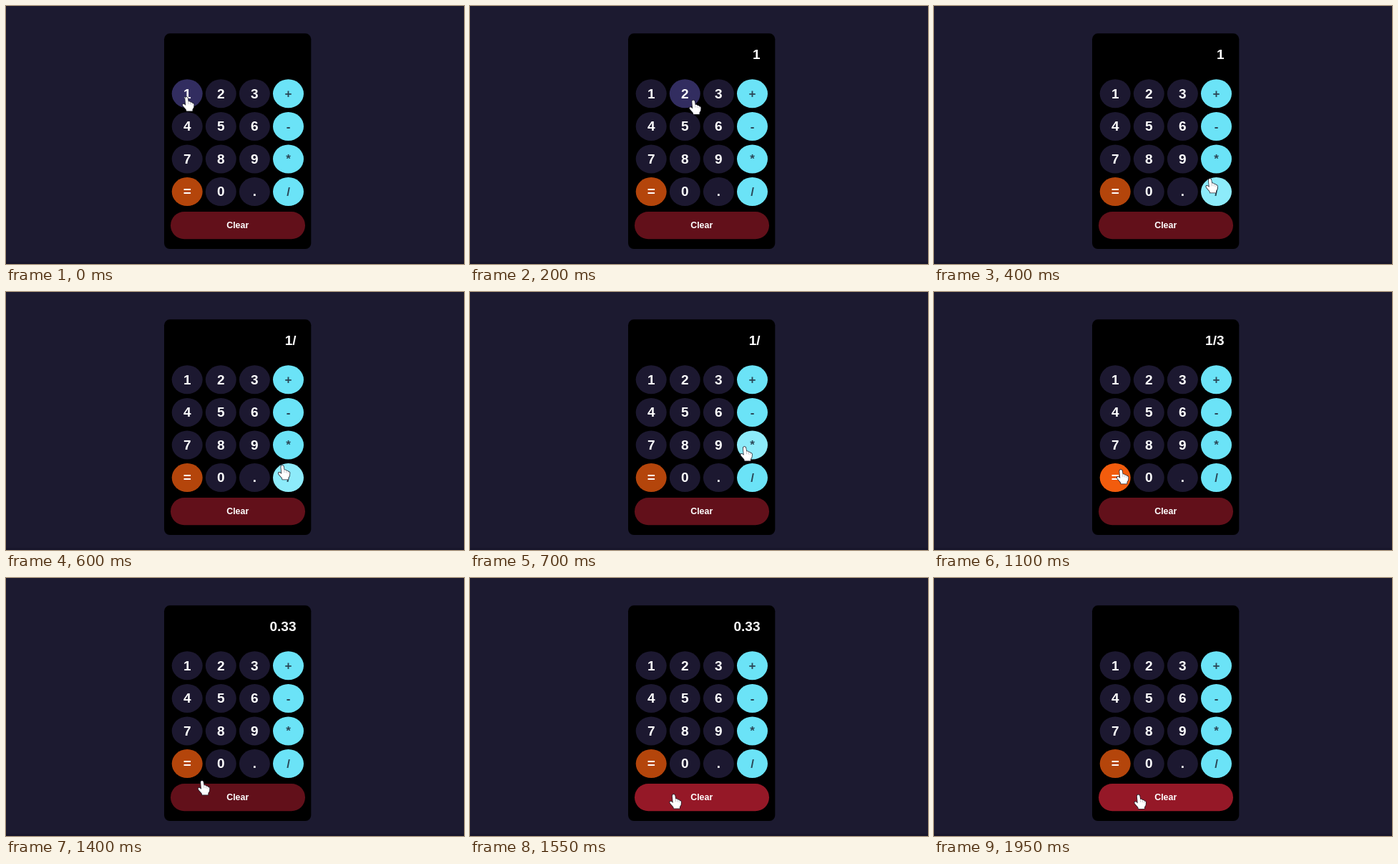
Animation, 640 px wide and 360 px high, one loop 2 s. Source, as an HTML page with a canvas:

```html
<!DOCTYPE html>
<html lang="en">
<head>
<meta charset="utf-8">
<title>Calculator</title>
<style>
html, body { margin: 0; width: 100%; height: 100%; overflow: hidden; background: #1c1a30; }
canvas { display: block; width: 640px; height: 360px; }
</style>
</head>
<body>
<canvas id="stage" width="640" height="360"></canvas>
<script>
const ctx = document.getElementById('stage').getContext('2d');
const LOOP = 2000, STEP = 50;
const FONT = '"Liberation Sans", Arial, sans-serif';

const THEMES = {
  digit: { base: '#1c1830', hover: '#322d60', ink: '#ffffff', size: 19 },
  op: { base: '#6be3f7', hover: '#8debfa', ink: '#2b4757', size: 17 },
  equals: { base: '#b4450b', hover: '#f25c0d', ink: '#ffffff', size: 19 }
};

const keys = [...'123+456-789*=0./'].map((label, i) => ({
  label,
  x: 253.2 + (i % 4) * 47.1,
  y: 122.3 + Math.floor(i / 4) * 45.6,
  theme: THEMES[label === '=' ? 'equals' : i % 4 === 3 ? 'op' : 'digit']
}));
const KEY_RX = 21.5, KEY_RY = 20;
const clearKey = { x: 230, y: 287, w: 188, h: 38.3 };

// Pointer stops: time, x, y of the fingertip
const path = [
  [0, 252.5, 127], [100, 253, 127], [200, 312.5, 131.5], [300, 362, 197],
  [400, 386, 241], [600, 386.5, 242], [700, 384, 216], [850, 355.5, 119],
  [950, 352, 121], [1100, 261.5, 248], [1300, 259, 251],
  [1450, 282, 299], [1550, 285, 302], [1950, 286, 302.5], [2000, 286, 302.5]
];

const readout = [[0, ''], [150, '1'], [500, '1/'], [1000, '1/3'], [1250, '0.33'], [1700, '']];

function pointerAt(t) {
  const i = path.findIndex((p, n) => n > 0 && t < p[0]);
  const [t0, x0, y0] = path[i - 1], [t1, x1, y1] = path[i];
  const u = (t - t0) / (t1 - t0);
  return { x: x0 + (x1 - x0) * u, y: y0 + (y1 - y0) * u };
}

function overKey(k, p) {
  return ((p.x - k.x) / KEY_RX) ** 2 + ((p.y - k.y) / KEY_RY) ** 2 < 1;
}

function overClear(p) {
  const { x, y, w, h } = clearKey;
  return p.x > x && p.x < x + w && p.y > y && p.y < y + h;
}

function pill(x, y, w, h, r, color) {
  ctx.fillStyle = color;
  ctx.beginPath();
  ctx.roundRect(x, y, w, h, r);
  ctx.fill();
}

function write(text, x, y, size, color, align = 'center') {
  ctx.font = `bold ${size}px ${FONT}`;
  ctx.textAlign = align;
  ctx.fillStyle = color;
  ctx.fillText(text, x, y);
}

const hand = new Path2D(
  'M-2.2 2 Q-2.2 0 -.5 0 Q1.3 0 1.5 2 L2.2 6.6 Q4.6 5.8 5.2 7.5 ' +
  'Q7.4 7 7.9 8.8 Q10 8.7 10 10.6 L9.7 14.5 L8 17.2 L8 19.6 L-.2 19.6 ' +
  'L-.7 17.6 L-5.3 12.2 Q-6.4 10.4 -4.9 9.8 Q-3.7 9.5 -1.3 12 Z');
const creases = new Path2D('M2.2 7 L2.6 10.2 M5.2 8 L5.4 10.6 M7.9 9.2 L7.8 11.2');

function drawHand(p) {
  ctx.save();
  ctx.translate(p.x, p.y);
  ctx.lineJoin = 'round';
  ctx.strokeStyle = '#20202c';
  ctx.lineWidth = 1.5;
  ctx.stroke(hand);
  ctx.fillStyle = '#ffffff';
  ctx.fill(hand);
  ctx.strokeStyle = '#9a9aa6';
  ctx.lineWidth = 0.6;
  ctx.stroke(creases);
  ctx.restore();
}

function draw(t) {
  const p = pointerAt(t);
  ctx.fillStyle = '#1c1a30';
  ctx.fillRect(0, 0, 640, 360);
  ctx.fillStyle = '#18162b';
  ctx.fillRect(0, 357, 640, 3);
  pill(221, 38.3, 205.3, 300.7, 8, '#000000');

  const shown = readout.filter(r => r[0] <= t).pop()[1];
  write(shown, 405.5, 74, 19, '#ffffff', 'right');

  for (const k of keys) {
    const { base, hover, ink, size } = k.theme;
    ctx.fillStyle = overKey(k, p) ? hover : base;
    ctx.beginPath();
    ctx.ellipse(k.x, k.y, KEY_RX, KEY_RY, 0, 0, Math.PI * 2);
    ctx.fill();
    write(k.label, k.x, k.y + size * 0.335, size, ink);
  }

  const { x, y, w, h } = clearKey;
  pill(x, y, w, h, h / 2, overClear(p) ? '#951827' : '#62101a');
  write('Clear', x + w / 2 - 0.3, 309.8, 12.4, '#ffffff');
  drawHand(p);
}

function tick() {
  draw(Math.floor((performance.now() % LOOP) / STEP) * STEP);
  requestAnimationFrame(tick);
}
tick();
</script>
</body>
</html>
```
